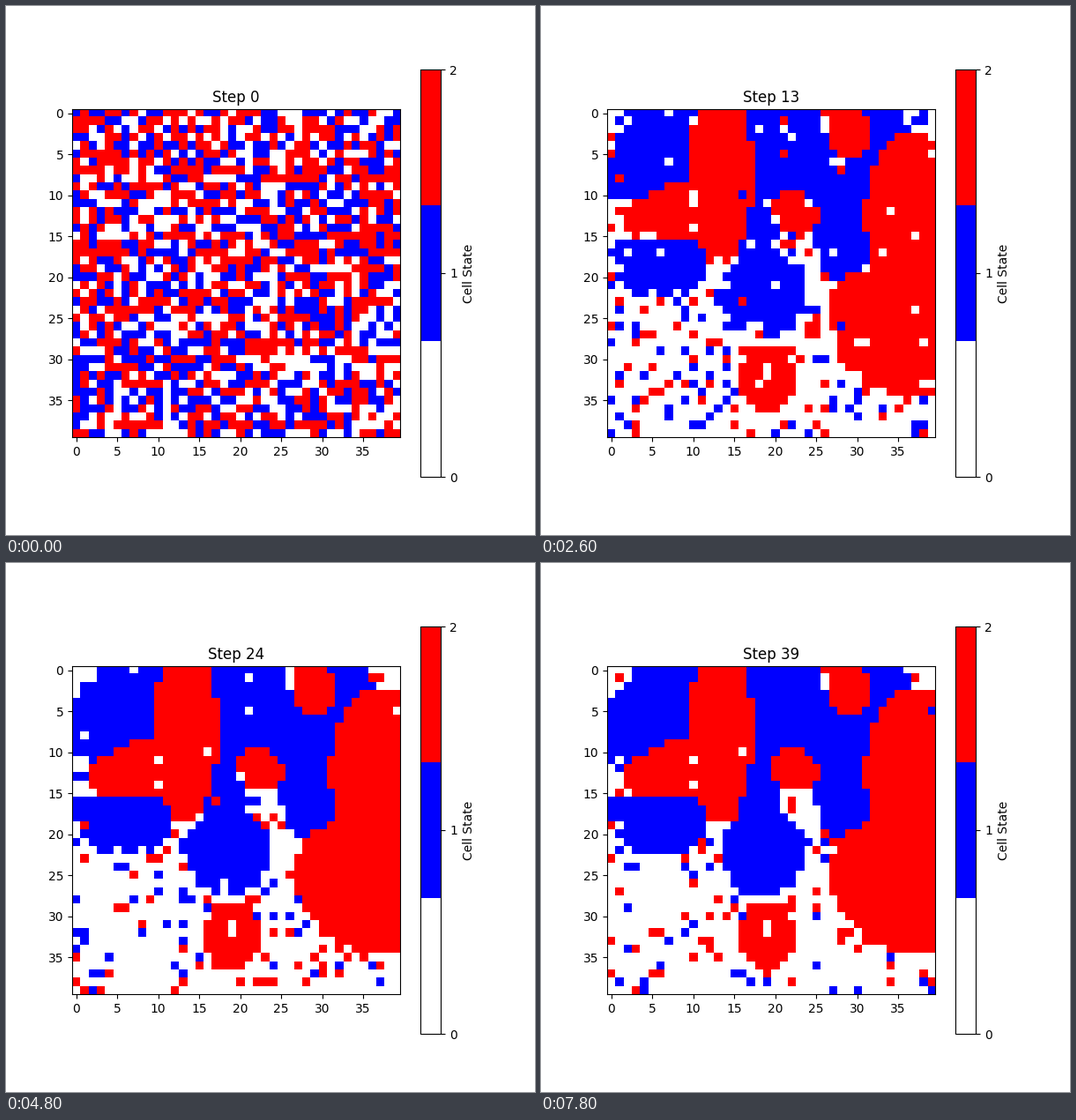
Recreate the animation shown at these times as a matplotlib script. Size 600 px wide and 600 px high, loop 8 s.

```python
import numpy as np
import matplotlib.pyplot as plt
from matplotlib.animation import FuncAnimation
from matplotlib.colors import ListedColormap

SIZE = 40
STEPS = 40
EMPTY, BLUE, RED = 0, 1, 2
SPARE = 45       # agents of each kind left without a home
AT_HOME = 2      # like neighbours needed to settle on home ground
ELSEWHERE = 5    # like neighbours needed anywhere else

rng = np.random.default_rng(8)

ys, xs = np.mgrid[:SIZE, :SIZE] + 0.5
home = np.zeros((SIZE, SIZE), dtype=int)


def claim(kind, x, y, rx, ry, tilt=0):
    """Make an ellipse of cells the home ground of a kind."""
    c, s = np.cos(np.radians(tilt)), np.sin(np.radians(tilt))
    u = (xs - x) * c + (ys - y) * s
    v = (ys - y) * c - (xs - x) * s
    home[(u / rx) ** 2 + (v / ry) ** 2 < 1] = kind


def alike(grid):
    """Count the neighbours of each cell that hold the same kind."""
    pad = np.pad(grid, 1, mode="reflect")
    count = -np.ones_like(grid)
    for dy in range(3):
        for dx in range(3):
            count += pad[dy:dy + SIZE, dx:dx + SIZE] == grid
    return count


def advance(grid):
    """Move every unsettled agent to a random empty cell."""
    needed = np.where(grid == home, AT_HOME, ELSEWHERE)
    movers = np.flatnonzero((grid != EMPTY) & (alike(grid) < needed))
    free = np.flatnonzero(grid == EMPTY)
    cells = grid.ravel().copy()
    for i in rng.permutation(movers):
        k = rng.integers(len(free))
        cells[free[k]] = cells[i]
        cells[i] = EMPTY
        free[k] = i
    return cells.reshape(SIZE, SIZE)


def simulate():
    counts = [np.sum(home == kind) + SPARE for kind in (BLUE, RED)]
    cells = np.repeat([EMPTY, BLUE, RED], [SIZE * SIZE - sum(counts), *counts])
    history = [rng.permutation(cells).reshape(SIZE, SIZE)]
    while len(history) < STEPS:
        history.append(advance(history[-1]))
    return history


# Blue: two patches on the left, then the linked masses in the middle
claim(BLUE, 6, 5.5, 7.2, 5, -45)
claim(BLUE, 6.5, 18.8, 6, 4.4)
claim(BLUE, 21.5, 6, 5.5, 8)
claim(BLUE, 26, 7.5, 8, 3.2)
claim(BLUE, 33.8, 3, 3.2, 4.5)
claim(BLUE, 29, 14.5, 3.8, 7)
claim(BLUE, 18.3, 15, 2.6, 8)
claim(BLUE, 19, 22.8, 5.2, 5.2)

# Red: left band with its arm, two islands, right side, lower disc
claim(RED, 13.8, 8, 3.9, 11.2)
claim(RED, 9, 12.5, 7.5, 3.4, -12)
claim(RED, 23.1, 12.5, 3.1, 2.6)
claim(RED, 29.3, 3, 2.6, 3)
claim(RED, 37.2, 13, 5.8, 10)
claim(RED, 35.3, 27, 9, 7.2, 45)
claim(RED, 19.5, 32.8, 3.6, 4.1)

grids = simulate()

fig, ax = plt.subplots(figsize=(6, 6), dpi=100)
image = ax.imshow(grids[0], cmap=ListedColormap(["white", "blue", "red"]),
                  vmin=0, vmax=2, interpolation="nearest")
fig.colorbar(image, ax=ax, ticks=[0, 1, 2], label="Cell State")
title = ax.set_title("Step 0")


def update(step):
    image.set_data(grids[step])
    title.set_text(f"Step {step}")
    return image, title


anim = FuncAnimation(fig, update, frames=STEPS, interval=200, repeat=True,
                     repeat_delay=0)
plt.show()
```
